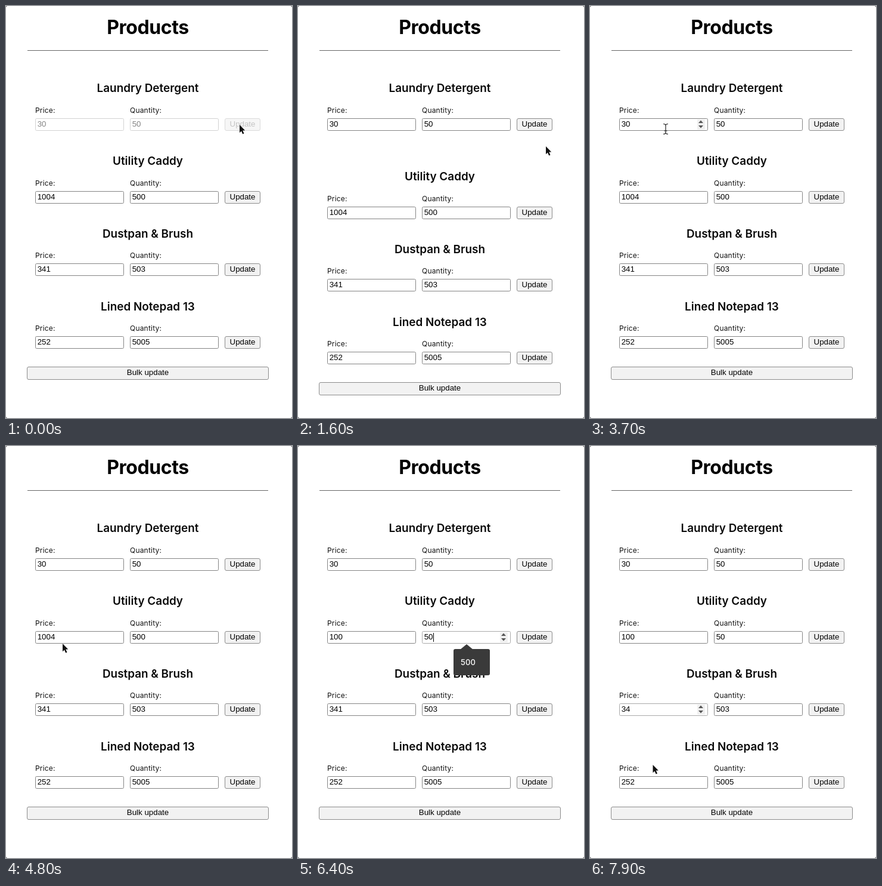
An HTML page that plays this animation: 480 px wide and 690 px high, repeating every 8000 ms.

```html
<!DOCTYPE html>
<html lang="en">
<head>
<meta charset="utf-8">
<title>Products</title>
<style>
  html, body { margin: 0; width: 100%; height: 100%; overflow: hidden; background: #fff; }
  svg { display: block; width: 480px; height: 690px; }
  text { font: 13.33px "Liberation Sans", Arial, sans-serif; fill: #000; white-space: pre; }
  .mid { text-anchor: middle; }
  .h1 { font: 700 32px Inter, sans-serif; letter-spacing: -.4px; }
  .h2 { font: 600 18.9px Inter, sans-serif; fill: #0a0a0a; }
  .label { font: 12px Inter, sans-serif; letter-spacing: .2px; fill: #111; }
  .loading { font: 16px Inter, sans-serif; letter-spacing: -.15px; fill: #111; }
  .tip { font: 500 13px Inter, sans-serif; letter-spacing: .1px; fill: #fff; }
</style>
</head>
<body>
<svg id="stage" viewBox="0 0 480 690"></svg>
<script>
const LOOP = 8000, STEP = 100;
const stage = document.getElementById('stage');
const products = ['Laundry Detergent', 'Utility Caddy', 'Dustpan &amp; Brush', 'Lined Notepad 13'];
const columns = [{ x: 49, label: 'Price:' }, { x: 208, label: 'Quantity:' }];
const FIELD = { y: 188, w: 149, h: 21 };
const ROW_PITCH = 121.7;

// Pointer path: time, x, y
const path = [
  [0, 392, 199], [200, 392, 199], [800, 416, 235], [3200, 416, 235], [3400, 320, 205],
  [3700, 127, 206], [3900, 95, 331], [4800, 95, 331], [5000, 96, 318], [5400, 96, 318],
  [6000, 250, 319], [6400, 250, 319], [7100, 106, 444], [7600, 106, 444], [7900, 105.5, 534], [8000, 105.5, 534]
];
const focusEvents = [[5000, 1, 0], [6000, 1, 1], [7200, 2, 0]];
const typing = [5300, 6300, 7500];

const between = (t, a, b) => t >= a && t < b;
const ease = k => k * k * (3 - 2 * k);
const rowY = i => Math.round(ROW_PITCH * i);
const text = (cls, x, y, s, fill = '') =>
  `<text class="${cls}" x="${x}" y="${y}"${fill && ` style="fill:${fill}"`}>${s}</text>`;
const box = (x, y, w, h, rx, fill, stroke) =>
  `<rect x="${x + .5}" y="${y + .5}" width="${w - 1}" height="${h - 1}" rx="${rx}" fill="${fill}" stroke="${stroke}"/>`;

function pointerAt(t) {
  const i = path.findIndex(p => p[0] > t);
  const [t0, x0, y0] = path[i - 1], [t1, x1, y1] = path[i];
  const k = ease((t - t0) / (t1 - t0));
  return { x: x0 + (x1 - x0) * k, y: y0 + (y1 - y0) * k };
}

const isOver = (p, row, col) =>
  between(p.x, columns[col].x, columns[col].x + FIELD.w) &&
  between(p.y, FIELD.y + rowY(row), FIELD.y + rowY(row) + FIELD.h);

const valuesAt = t => [
  ['30', '50'],
  [t < 5300 ? '1004' : '100', t < 6300 ? '500' : '50'],
  [t < 7500 ? '341' : '34', '503'],
  ['252', '5005']
];

function spinner(x, y) {
  return `<g transform="translate(${x} ${y})"><rect x="-6" y="-8" width="13" height="17" rx="1" fill="#f0f0f0"/>
    <path d="M-4-2L0-6.5 4-2zM-4 2L0 6.5 4 2z" fill="#555"/></g>`;
}

function field(x, y, value, { disabled, focused, hovered, caret }) {
  const border = disabled ? '#d2d2d2' : focused ? '#aaa' : '#858585';
  let out = box(x, y, FIELD.w, FIELD.h, 2, '#fff', border)
    + text('', x + 3.7, y + 14, value, disabled ? '#858585' : '');
  if (!disabled && (focused || hovered)) out += spinner(x + 137, y + 10);
  if (caret) out += `<rect x="${Math.round(x + 3.7 + value.length * 7.41)}" y="${y + 3}" width="1" height="15"/>`;
  return out;
}

function button(x, y, w, h, label, disabled) {
  return box(x, y, w, h, 2.5, disabled ? '#f6f6f6' : '#f2f2f2', disabled ? '#dadada' : '#8c8c8c')
    + text('mid', x + w / 2, y + 14, label, disabled ? '#c4c4c4' : '');
}

function page(t, pointer) {
  const saving = t < 1400;
  const shift = between(t, 1400, 2300) ? 26 : 0;
  const values = valuesAt(t);
  const [since, focusRow, focusCol] = focusEvents.filter(e => e[0] <= t).pop() || [];
  const lastInput = Math.max(since || 0, ...typing.filter(k => k <= t));
  const caretOn = (t - lastInput) % 1000 < 400;

  let out = text('h1 mid', 238, 47, 'Products') + '<rect x="36" y="74" width="404" height="1" fill="#666"/>';
  products.forEach((name, row) => {
    const offset = row ? shift : 0;
    const y = rowY(row) + offset;
    const disabled = saving && row === 0;
    out += text('h2 mid', 238, 144.4 + ROW_PITCH * row + offset, name);
    columns.forEach(({ x, label }, col) => {
      const focused = row === focusRow && col === focusCol;
      const hovered = isOver(pointer, row, col);
      out += text('label', x, y + 179, label)
        + field(x, y + FIELD.y, values[row][col], { disabled, focused, hovered, caret: focused && caretOn });
    });
    out += button(367, y + FIELD.y, 60, FIELD.h, 'Update', disabled);
  });
  out += button(35, 604 + shift, 406, 22, 'Bulk update');
  if (between(t, 6300, 7200)) {
    out += '<path d="M272 341L283 332 294 341z" fill="#3a3a3a"/>'
      + '<rect x="261" y="340" width="61" height="44" rx="3" fill="#3a3a3a"/>'
      + text('tip', 273, 367, '500');
  }
  return out;
}

const ARROW = '<path d="M0 0V13.2L3 10.5 5.2 15.6 7.5 14.6 5.3 9.6H9.3Z" fill="#111" stroke="#fff" paint-order="stroke"/>';
const IBEAM = '<path d="M-4-8.5Q0-8.5 0-6V6Q0 8.5-4 8.5M4-8.5Q0-8.5 0-6M0 6Q0 8.5 4 8.5M-2.5 3H2.5" fill="none" stroke="#222" stroke-width="1.2"/>';

function cursor(t, p) {
  if (typing.some(k => between(t, k, k + 200))) return '';
  const overField = products.some((_, row) => columns.some((_, col) => isOver(p, row, col)));
  return `<g transform="translate(${p.x} ${p.y})">${overField ? IBEAM : ARROW}</g>`;
}

const corners = '<path d="M0 0h2l-2 2zM480 0v2l-2-2zM0 690v-2l2 2zM480 690h-2l2-2z" fill="#777"/>';

let drawn = -1;
function frame() {
  const t = Math.floor(performance.now() % LOOP / STEP) * STEP;
  if (t !== drawn) {
    drawn = t;
    const pointer = pointerAt(t);
    const content = between(t, 2300, 3000) ? text('loading', 35, 26, 'loading...') : page(t, pointer);
    stage.innerHTML = content + cursor(t, pointer) + corners;
  }
  requestAnimationFrame(frame);
}
frame();
</script>
</body>
</html>
```
